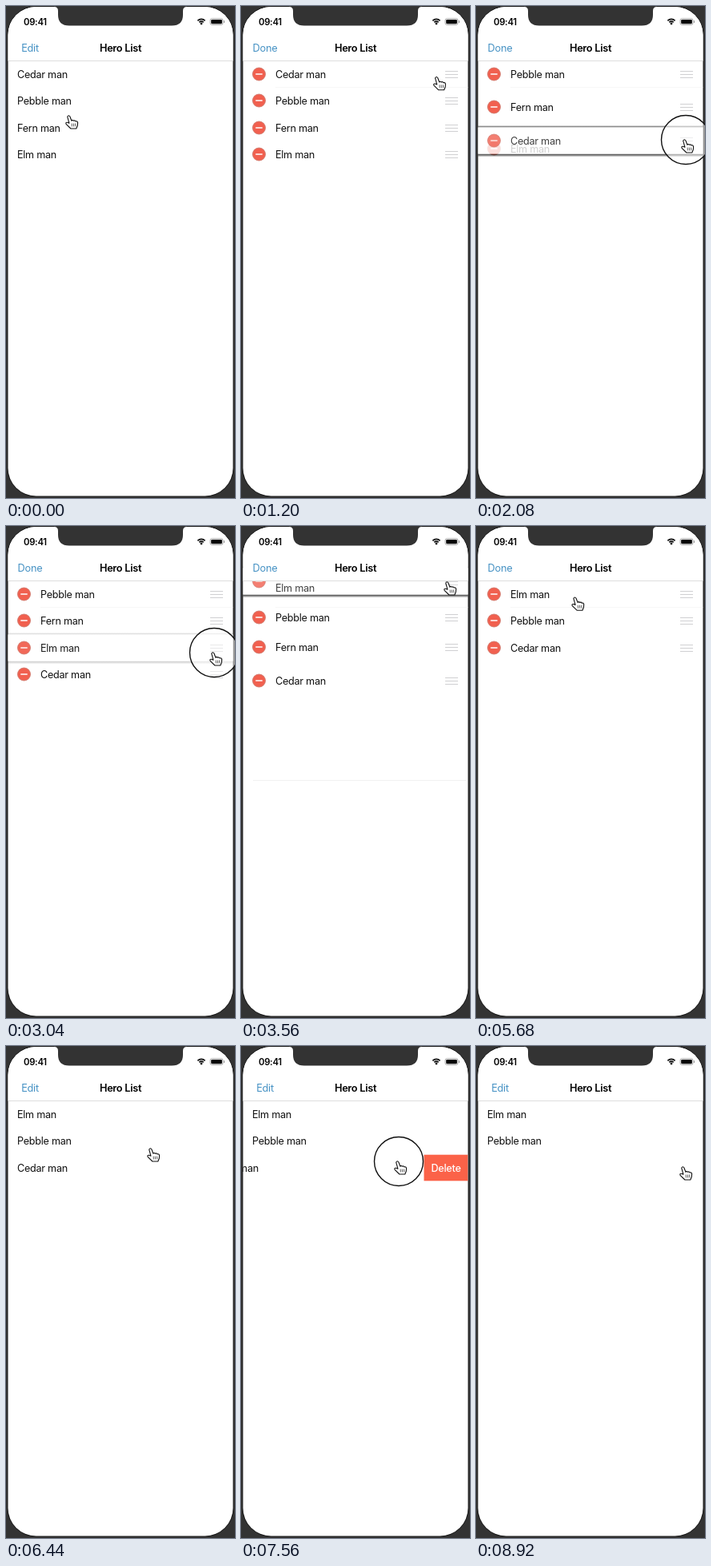
Write an HTML page with a canvas that moves like this. It is 286 px wide and 614 px high and loops after 9440 ms.

```html
<!DOCTYPE html>
<html lang="en">
<head>
<meta charset="utf-8">
<title>Hero List</title>
<style>
html, body { margin: 0; width: 100%; height: 100%; overflow: hidden; background: #333 }
canvas { display: block; width: 286px; height: 614px }
</style>
</head>
<body>
<canvas id="stage"></canvas>
<script>
const LOOP = 9440, W = 286, H = 614, LEFT = 2.5, RIGHT = 283.5;
const TOP = 85, PITCH = 33.3, HALF = 16.6, BUTTON = 55;
const canvas = document.getElementById('stage');
const c = canvas.getContext('2d');
const dpr = window.devicePixelRatio || 1;
canvas.width = W * dpr;
canvas.height = H * dpr;

// 0 to 1 over dur, smooth at both ends.
function ease(t, start, dur = 240) {
  const u = Math.min(1, Math.max(0, (t - start) / dur));
  return u * u * (3 - 2 * u);
}
const pulse = (t, on, off, dur = 120) => ease(t, on, dur) - ease(t, off, dur);
// Each step [start, duration, target] eases the value on from where it is.
const follow = (t, v, steps) =>
  steps.reduce((now, [start, dur, to]) => now + (to - now) * ease(t, start, dur), v);

// Pointer moves: start, duration, x, y.
const moves = [
  [40, 440, 32, 48], [780, 440, 246, 89], [1240, 280, 261, 84],
  [1840, 240, 261, 167], [2240, 360, 259, 158],
  [3040, 400, 258, 70], [3600, 720, 21, 149],
  [4600, 320, 232, 144], [4920, 240, 258, 145],
  [5480, 360, 30, 50], [6100, 340, 181, 128], [6440, 160, 261, 151],
  [7280, 240, 196, 144], [7640, 320, 259, 151]
];
const axis = i => moves.map(m => [m[0], m[1], m[i]]);
const movesX = axis(2), movesY = axis(3);

// Neighbours make room one after another while a row is dragged past.
const makeRoom = slot => [
  [1860 + 82 * (slot - 1), 200, slot - 1],
  [3385 - 27 * (slot - 1), 300, slot]
];
const bounce = t => 8 * pulse(t, 3400, 3580);
const swipe = (open, remove) => t =>
  -BUTTON * ease(t, open) - (RIGHT - BUTTON) * ease(t, remove, 200);

const rows = [
  { name: 'Pebble man', slot: 1, steps: makeRoom(1) },
  { name: 'Fern man', slot: 2, steps: makeRoom(2), slide: swipe(4560, 5200), gone: 5200 },
  { name: 'Elm man', slot: 3, steps: [makeRoom(3)[0], [3040, 400, -0.48], [3600, 200, 0]],
    lift: t => pulse(t, 3000, 3660) },
  { name: 'Cedar man', slot: 0, steps: [[1840, 240, 2.48], [2240, 200, 3], [5200, 240, 2]],
    lift: t => pulse(t, 1750, 2320), slide: swipe(7280, 8040), gone: 8120 }
];

function text(str, x, y, { size = 12.6, weight = 400, color = '#111', align = 'left', gap = -0.25 } = {}) {
  c.font = `${weight} ${size}px Inter, "Liberation Sans", sans-serif`;
  c.letterSpacing = gap + 'px';
  c.textAlign = align;
  c.fillStyle = color;
  c.fillText(str, x, y);
}

function line(x1, y1, x2, y2, color, width = 1) {
  c.strokeStyle = color;
  c.lineWidth = width;
  c.beginPath();
  c.moveTo(x1, y1);
  c.lineTo(x2, y2);
  c.stroke();
}

function disc(x, y, r, fill, stroke = fill, width = 0.01) {
  c.fillStyle = fill;
  c.strokeStyle = stroke;
  c.lineWidth = width;
  c.beginPath();
  c.arc(x, y, r, 0, 7);
  c.fill();
  c.stroke();
}

function box(x, y, w, h, r) {
  c.beginPath();
  c.roundRect(x, y, w, h, r);
}

function withAlpha(a, draw) {
  const old = c.globalAlpha;
  c.globalAlpha = old * a;
  draw();
  c.globalAlpha = old;
}

function shade(y, h, strength) {
  const g = c.createLinearGradient(0, y, 0, y + h);
  g.addColorStop(0, `rgba(0,0,0,${strength})`);
  g.addColorStop(1, 'rgba(0,0,0,0)');
  c.fillStyle = g;
  c.fillRect(0, Math.min(y, y + h), W, Math.abs(h));
}

function drawRow(row, t, edit) {
  const up = row.lift ? row.lift(t) : 0;
  const dx = row.slide ? row.slide(t) : 0;
  const left = row.gone ? 1 - ease(t, row.gone) : 1;
  if (!left) return;
  // A lifted row keeps its place; only its label shifts with the list.
  const shift = bounce(t);
  const y = Math.round(TOP + PITCH * follow(t, row.slot, row.steps) + (up ? 0 : shift));
  c.save();
  if (up) {
    shade(y - HALF, -2.5, 0.7 * up);
    shade(y + HALF, 4, 0.8 * up);
    c.globalAlpha = 1 - 0.2 * up;
    c.fillStyle = '#fff';
    c.fillRect(0, y - HALF, W, 2 * HALF);
  }
  if (dx) {
    c.beginPath();
    c.rect(0, y - HALF, W, 2 * HALF * left);
    c.clip();
    c.fillStyle = '#fb6248';
    c.fillRect(RIGHT + dx, y - HALF, -dx, 2 * HALF);
    text('Delete', RIGHT + dx + BUTTON / 2, y + 4.5, { weight: 500, color: '#fff', align: 'center' });
  }
  c.translate(dx, y);
  text(row.name, 14 + 29 * edit, 4.5 + (up ? shift : 0));
  withAlpha(edit, () => {
    const x = 29 * edit - 6.5;
    disc(x, 0, 8, '#f1604f', '#cf7a6e', 0.9);
    line(x - 4.2, 0, x + 4.2, 0, '#fff', 1.6);
    for (const dy of [-4, 0, 4]) line(255, dy + 0.5, 271, dy + 0.5, '#d0d0d2');
  });
  c.restore();
}

function drawNav(edit) {
  c.fillStyle = '#fff';
  c.fillRect(0, 0, W, 68);
  line(0, 68.5, W, 68.5, '#dedede');
  const title = { size: 12.75, weight: 600, align: 'center', color: '#000', gap: -0.3 };
  const link = { size: 12.75, align: 'center', color: '#4692c4' };
  text('Hero List', 143, 56.5, title);
  withAlpha(1 - edit, () => text('Edit', 30, 56.5, link));
  withAlpha(edit, () => text('Done', 30, 56.5, link));

  text('09:41', 22, 23.8, { size: 11.3, weight: 600, color: '#000', gap: -0.3 });
  for (const r of [3.8, 6.6]) {
    c.strokeStyle = '#111';
    c.lineWidth = 1.7;
    c.beginPath();
    c.arc(244, 23, r, -2.35, -0.8);
    c.stroke();
  }
  disc(244, 22, 1.4, '#111');
  c.fillStyle = c.strokeStyle = '#999';
  c.lineWidth = 0.8;
  box(255, 15.7, 16, 7.8, 2.3);
  c.stroke();
  c.fillRect(272, 18.2, 1, 2.8);
  c.fillStyle = '#000';
  box(256.2, 16.9, 13.6, 5.4, 1.3);
  c.fill();
}

const notch = new Path2D('M60 0V1Q65 1 65 6V11Q65 24.5 79 24.5H207Q221 24.5 221 11V6Q221 1 226 1V0Z');
const hand = new Path2D('M-1.6 1.2Q0-1.6 1.6 1L3.6 6.2Q5 4.6 6 6.3Q8 5.2 8.7 7Q10.8 6.2 11.3 8.6' +
  'L11 12.2L9.5 16H2.6L-3.2 10.4Q-4.2 8 -1.6 8.3L0.6 9.2Z');

function drawPointer(x, y) {
  c.save();
  c.translate(x - 0.7, y);
  c.fillStyle = '#fff';
  c.fill(hand);
  c.strokeStyle = '#111';
  c.lineWidth = 1.1;
  c.lineJoin = 'round';
  c.stroke(hand);
  for (const dx of [3.8, 6, 8.2]) line(dx, 9.6, dx + 0.3, 13.4, '#333', 0.8);
  c.restore();
}

function draw(t) {
  const edit = pulse(t, 800, 6040, 280);
  const lifted = row => row.lift && row.lift(t) > 0;
  c.setTransform(dpr, 0, 0, dpr, 0, 0);
  c.fillStyle = '#333';
  c.fillRect(0, 0, W, H);

  c.save();
  box(LEFT, 1, RIGHT - LEFT, 610.5, 35);
  c.strokeStyle = '#111';
  c.lineWidth = 1.6;
  c.stroke();
  c.clip();
  c.fillStyle = '#fff';
  c.fillRect(0, 0, W, H);
  withAlpha(edit, () => line(43, 101.5, RIGHT, 101.5, '#f7f7f7'));
  if (bounce(t)) line(15, 317.5, 281, 317.5, '#f1f1f1');
  for (const row of rows) if (!lifted(row)) drawRow(row, t, edit);
  for (const row of rows) if (lifted(row)) drawRow(row, t, edit);
  drawNav(edit);
  c.restore();

  c.fillStyle = '#333';
  c.fill(notch);

  const x = follow(t, 79, movesX), y = follow(t, 137, movesY);
  const press = pulse(t, 1720, 2240) + pulse(t, 2700, 3420) + pulse(t, 6880, 7560);
  withAlpha(press, () => disc(x + 1, y, 30.5, 'rgba(255,255,255,.5)', '#111', 1.4));
  drawPointer(x, y);
}

const start = performance.now();
function tick() {
  draw((performance.now() - start) % LOOP);
  requestAnimationFrame(tick);
}
tick();
</script>
</body>
</html>
```
